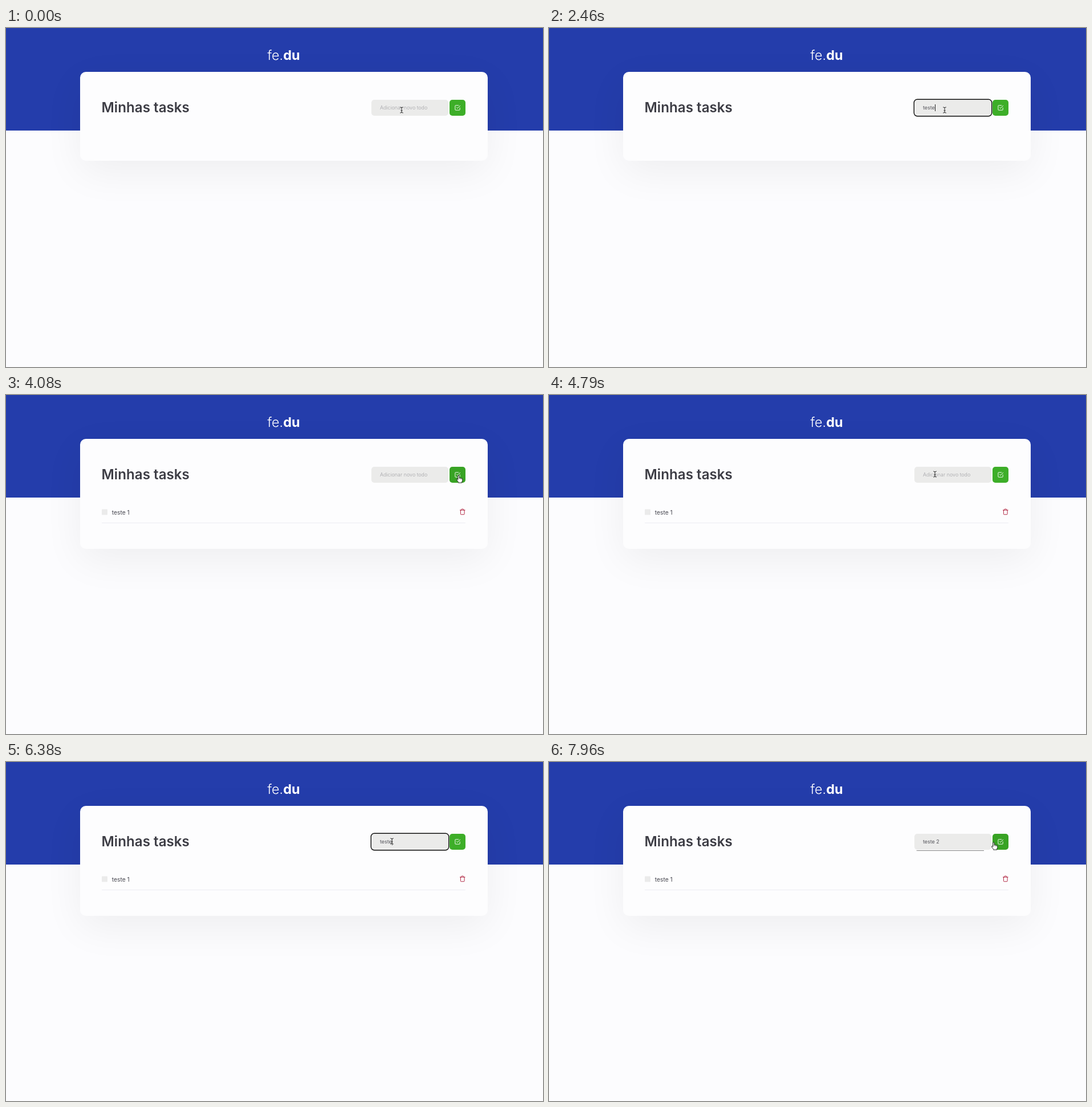
An HTML page that plays this animation: 942 px wide and 595 px high, repeating every 8000 ms.

```html
<!DOCTYPE html>
<html lang="pt-BR">
<head>
<meta charset="utf-8">
<title>Minhas tasks</title>
<style>
  html, body { margin: 0; width: 100%; height: 100%; overflow: hidden; background: #fcfcfe; }
  body { font-family: Inter, "Open Sans", sans-serif; }
  #stage { position: relative; width: 942px; height: 595px; overflow: hidden; background: #fcfcfe; }
  #stage > * { position: absolute; box-sizing: border-box; }
  .step { animation: 8s step-end infinite; }

  header { left: 0; top: 0; width: 942px; height: 179.5px; background: #243dab; }
  #card {
    left: 129.5px; top: 77px; width: 715px; height: 156px; border-radius: 10px;
    background: #fdfdfe; box-shadow: 0 20px 70px rgba(0, 0, 0, .06);
    animation-name: grow;
  }
  #field {
    left: 641px; top: 126px; width: 134.5px; height: 27.5px; padding-left: 15px;
    display: flex; align-items: center; border-radius: 5px;
    background: #ebebea; color: #55555c; font-size: 8.95px; line-height: 12px; white-space: pre;
    animation-name: focus;
  }
  #hint { position: absolute; left: 15px; color: #a2a2a6; font-weight: 300; }
  #caret { width: 1px; height: 12px; background: #222; }
  #button {
    left: 778px; top: 126px; width: 28px; height: 28px; border-radius: 5px;
    background: #3dae28; animation-name: hover;
  }
  svg { left: 0; top: 0; }
  .icon { fill: none; stroke-width: 2; stroke-linecap: round; stroke-linejoin: round; }
  #task { animation-name: added; }
  #pointer { animation: travel 8s ease-in-out infinite; }
  #beam { animation-name: leave; }
  #hand { animation-name: enter; }

  @keyframes grow { 0% { height: 156px; } 48.25%, 100% { height: 193px; } }
  @keyframes added { 0% { opacity: 0; } 48.25%, 100% { opacity: 1; } }
  @keyframes focus {
    0%, 47%, 98.25%, 100% { box-shadow: none; }
    7.5%, 63% { box-shadow: 0 0 0 1.4px #0c0c0c; }
  }
  @keyframes hover {
    0%, 55.1%, 100% { background: #3dae28; }
    42.6%, 95.4% { background: #38a324; }
  }
  @keyframes enter { 0%, 55.1% { opacity: 0; } 42.6%, 95.4%, 100% { opacity: 1; } }
  @keyframes leave { 0%, 55.1% { opacity: 1; } 42.6%, 95.4%, 100% { opacity: 0; } }
  @keyframes travel {
    0%, 37.75% { transform: translate(694px, 144px); }
    44.6%, 53.75% { transform: translate(794px, 140.5px); }
    58.75%, 91% { transform: translate(677px, 139px); }
    96%, 100% { transform: translate(780px, 140.5px); }
  }
</style>
</head>
<body>
<div id="stage">
  <header></header>
  <div id="card" class="step"></div>
  <div id="field" class="step"><span id="hint">Adicionar novo todo</span><span id="typed"></span><i id="caret"></i></div>
  <div id="button" class="step"></div>
  <svg width="942" height="595" viewBox="0 0 942 595">
    <text x="487" y="56" text-anchor="middle" font-size="23.5" font-weight="300" fill="#fff">fe.<tspan font-weight="700">du</tspan></text>
    <text x="167.5" y="148" font-size="24.2" font-weight="600" fill="#3d3d45">Minhas tasks</text>
    <path class="icon" stroke="#fff" transform="translate(786.5 134.5) scale(.46)"
      d="M9 11l3 3L22 4M21 12v7a2 2 0 0 1-2 2H5a2 2 0 0 1-2-2V5a2 2 0 0 1 2-2h11"/>
    <g id="task" class="step">
      <rect x="168" y="200.5" width="10" height="10" rx="1" fill="#ebebeb"/>
      <text x="185.7" y="209.7" font-size="10.3" fill="#46464f">teste 1</text>
      <path d="M168 224.5H806" stroke="#ececf3"/>
      <path class="icon" stroke="#b0233f" transform="translate(795 199.2) scale(.48)"
        d="M3 6h18M19 6v14a2 2 0 0 1-2 2H7a2 2 0 0 1-2-2V6M8 6V4a2 2 0 0 1 2-2h4a2 2 0 0 1 2 2v2"/>
    </g>
    <g id="pointer">
      <g id="beam" class="step" fill="none" stroke-linecap="round">
        <path id="beamShape" d="M-2.5-5Q-.5-5 0-4Q.5-5 2.5-5M0-4V4M-2.5 5Q-.5 5 0 4Q.5 5 2.5 5M-1.2 1H1.2" stroke="#fff" stroke-opacity=".7" stroke-width="2"/>
        <use href="#beamShape" style="display:none"/>
        <path d="M-2.5-5Q-.5-5 0-4Q.5-5 2.5-5M0-4V4M-2.5 5Q-.5 5 0 4Q.5 5 2.5 5M-1.2 1H1.2" stroke="#222"/>
      </g>
      <g id="hand" class="step" stroke="#111" stroke-width=".9" stroke-linejoin="round">
        <path fill="#fff" d="M-1.2 1Q0-.6 1.1 1V5Q2.4 4.2 3.2 5.4Q4.5 4.8 5.1 6Q6.8 5.8 6.8 7.6V9.5Q6.6 11 5.6 12V13.6H-.4V12.4Q-2.6 10.3-3.6 8Q-3.4 6.8-2.2 7.2L-1.2 8.2Z"/>
        <path d="M1.1 5V7M3.2 5.6V7.4M5.1 6.2V7.6" stroke-width=".6"/>
      </g>
    </g>
  </svg>
</div>
<script>
  const $ = id => document.getElementById(id);
  const entries = [
    { text: "teste 1", focus: 600, keys: [1220, 1420, 1620, 1820, 2060, 2500, 2630], blur: 3760, clear: 3860 },
    { text: "teste 2", focus: 5040, keys: [5640, 5800, 5960, 6120, 6290, 6700, 6900], blur: 7860, clear: 8000 }
  ];
  const clock = $("card").getAnimations()[0];

  function draw() {
    const t = (clock.currentTime || 0) % 8000;
    const entry = entries.find(e => t >= e.focus && t < e.clear);
    const pressed = entry ? entry.keys.filter(k => k <= t) : [];
    const typed = entry ? entry.text.slice(0, pressed.length) : "";
    const focused = entry && t < entry.blur;
    const since = focused ? t - (pressed.at(-1) ?? entry.focus) : 0;
    $("typed").textContent = typed;
    $("hint").style.visibility = typed ? "hidden" : "visible";
    // The caret blinks every half second, restarting at each key press.
    $("caret").style.opacity = focused && since % 1000 < 500 ? 1 : 0;
    requestAnimationFrame(draw);
  }
  draw();
</script>
</body>
</html>
```
